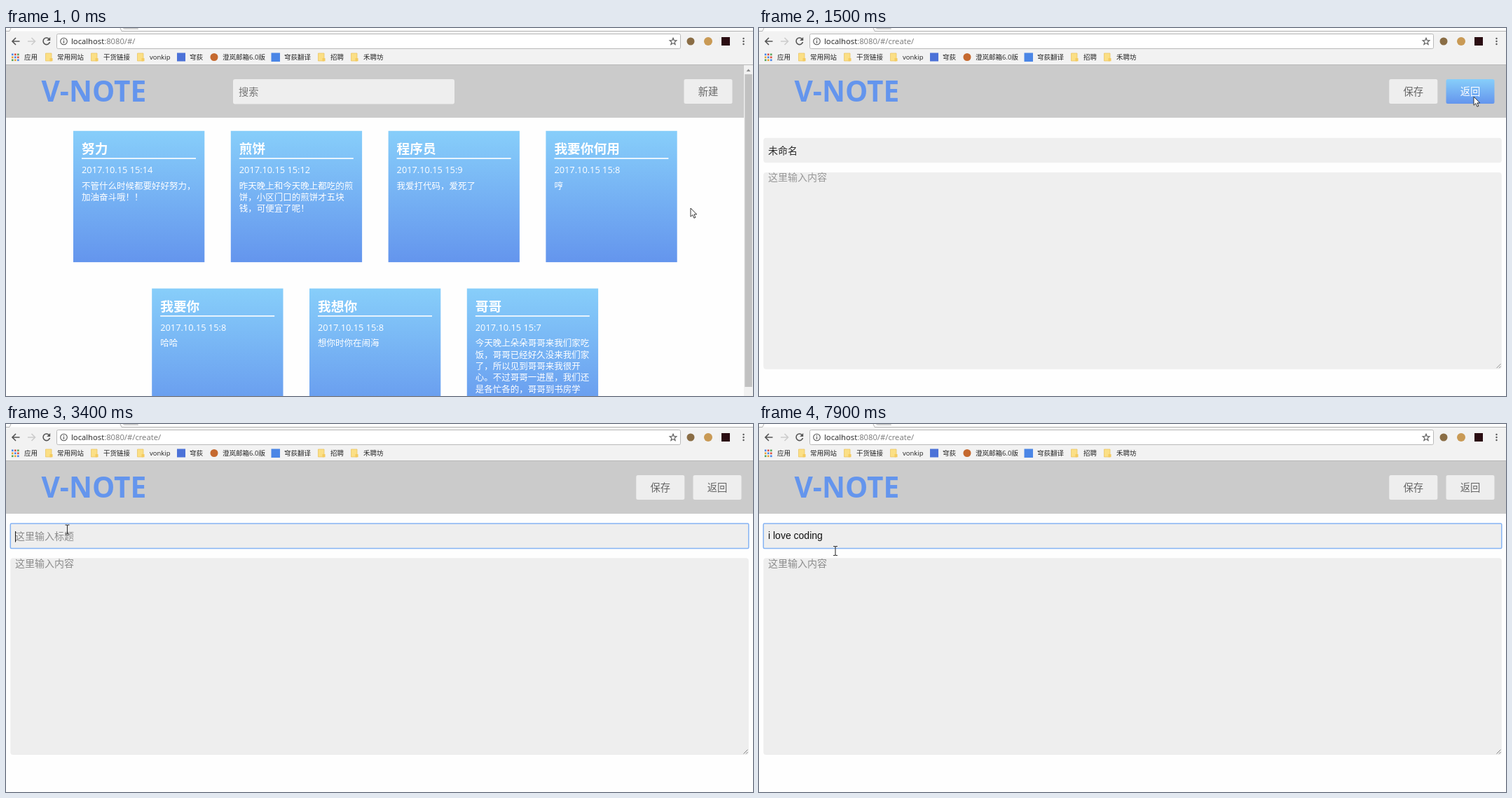
These frames come from a looping animation (1066 by 525 pixels, 8000 ms). An HTML page:

```html
<!DOCTYPE html>
<html lang="zh">
<head>
<meta charset="utf-8">
<title>V-NOTE</title>
<style>
html, body { margin: 0; width: 100%; height: 100%; overflow: hidden; background: #fefefe; }
svg { display: block; width: 1066px; height: 525px; }
text { font-family: "Open Sans", "Noto Sans CJK SC", "Noto Sans CJK", sans-serif; white-space: pre; }
.cjk { font-family: "Noto Sans CJK SC", "Noto Sans CJK", sans-serif; }
.typed { font-family: "Liberation Sans", "Noto Sans CJK SC", "Noto Sans CJK", sans-serif; }
</style>
</head>
<body>
<svg id="stage" viewBox="0 0 1066 525" xmlns="http://www.w3.org/2000/svg">
  <defs>
    <linearGradient id="sky" x1="0" y1="0" x2="0" y2="1">
      <stop offset="0" stop-color="#87cefa"/><stop offset="1" stop-color="#6495ed"/>
    </linearGradient>
  </defs>
</svg>
<script>
const stage = document.getElementById('stage');
const LOOP = 8000, STEP = 100;

function add(parent, tag, attrs, content) {
  const el = document.createElementNS('http://www.w3.org/2000/svg', tag);
  set(el, attrs);
  if (content !== undefined) el.textContent = content;
  parent.appendChild(el);
  return el;
}
function set(el, attrs) {
  for (const key in attrs) el.setAttribute(key, attrs[key]);
}
const show = (el, on) => el.setAttribute('display', on ? 'inline' : 'none');
const group = (parent = stage) => add(parent, 'g', {});
const rect = (p, x, y, width, height, fill, more) => add(p, 'rect', { x, y, width, height, fill, ...more });
const circle = (p, cx, cy, r, fill, more) => add(p, 'circle', { cx, cy, r, fill, ...more });
const path = (p, d, more) => add(p, 'path', { d, fill: 'none', ...more });
const label = (p, x, y, size, fill, str, more) => add(p, 'text', { x, y, 'font-size': size, fill, ...more }, str);

// Page background and header bar
rect(stage, 0, 0, 1066, 525, '#fefefe');
const listPage = group(), createPage = group();
rect(stage, 0, 53, 1066, 75, '#cbcbcb');
label(stage, 50.5, 105, 40.6, '#6495ed', 'V-NOTE', { 'font-weight': 700 });

const searchBox = group();
rect(searchBox, 324, 73, 316, 35.5, '#eee', { rx: 3 });
label(searchBox, 332, 95.5, 14.2, '#757575', '搜索', { class: 'cjk' });

function button(x, caption) {
  const g = group();
  const box = rect(g, x, 73, 69, 35, '#eee', { rx: 2.5 });
  const text = label(g, x + 34.5, 96, 14.3, '#666', caption, { class: 'cjk', 'text-anchor': 'middle' });
  return {
    g,
    hover(on, focused) {
      set(box, { fill: on ? 'url(#sky)' : '#eee', stroke: focused ? '#6f9fee' : 'none' });
      set(text, { fill: on ? '#fff' : '#666' });
    }
  };
}
const newButton = button(967.5, '新建');
const saveButton = button(886.3, '保存');
const backButton = button(967.5, '返回');

// Note cards
function card(x, y, title, time, lines) {
  const white = '#fff';
  rect(listPage, x, y, 187.3, 187.3, 'url(#sky)');
  label(listPage, x + 12, y + 32.5, 18.72, white, title, { class: 'cjk', 'font-weight': 700 });
  rect(listPage, x + 12, y + 38.5, 163, 1.6, white);
  label(listPage, x + 12, y + 60, 12.8, white, '2017.10.15 ' + time);
  lines.forEach((line, i) =>
    label(listPage, x + 12, y + 82.8 + i * 16.3, 12.5, white, line, { class: 'cjk' }));
}
[
  ['努力', '15:14', ['不管什么时候都要好好努力，', '加油奋斗哦！！']],
  ['煎饼', '15:12', ['昨天晚上和今天晚上都吃的煎', '饼，小区门口的煎饼才五块', '钱，可便宜了呢！']],
  ['程序员', '15:9', ['我爱打代码，爱死了']],
  ['我要你何用', '15:8', ['哼']],
  ['我要你', '15:8', ['哈哈']],
  ['我想你', '15:8', ['想你时你在闹海']],
  ['哥哥', '15:7', ['今天晚上朵朵哥哥来我们家吃', '饭，哥哥已经好久没来我们家',
    '了，所以见到哥哥来我很开', '心。不过哥哥一进屋，我们还', '是各忙各的，哥哥到书房学']]
].forEach((note, i) => {
  const lower = i > 3;
  card((lower ? 208.2 : 96) + (lower ? i - 4 : i) * 224.8, lower ? 371.6 : 146.8, ...note);
});

// Editor
const titleBox = rect(createPage, 6.3, 142, 1053.5, 35.5, '#eee', { rx: 4 });
const bodyBox = rect(createPage, 6.3, 191.3, 1053.5, 280.7, '#eee', { rx: 4 });
const grip = path(createPage, 'M1052.5 470.5l6-6M1056 470.5l2.5-2.5', { stroke: '#777', 'stroke-width': 0.9 });
const titleText = label(createPage, 13, 165, 14, '#111', '', { class: 'typed' });
label(createPage, 13, 203.6, 14, '#8c8c8c', '这里输入内容', { class: 'cjk', 'font-weight': 300 });
const caret = rect(createPage, 0, 153, 1, 15.5, '#111');

// Scrollbar
const scrollbar = group();
rect(scrollbar, 1053, 53, 13, 472, '#f1f1f1');
path(scrollbar, 'M1056.5 62l3-3.5 3 3.5z', { fill: '#8a8a8a' });
const thumb = rect(scrollbar, 1054.3, 66, 10.5, 446, '#c1c1c1');

// Browser frame
const chrome = group();
rect(chrome, 0, 0, 1066, 5, '#fff');
rect(chrome, 0, 4.5, 1066, 48, '#f2f2f2');
path(chrome, 'M0 4.5H5L7 0M163 0l2 4.5H1066', { stroke: '#b2b2b2' });
path(chrome, 'M167 0h20l2 1.5h-20z', { fill: '#ddd', stroke: '#bbb', 'stroke-width': 0.6 });
rect(chrome, 0, 52, 1066, 1, '#b8b8b8');
rect(chrome, 72.5, 8.5, 890, 21, '#fff', { rx: 2, stroke: '#b9b9b9' });
const dark = { stroke: '#555', 'stroke-width': 1.6 };
path(chrome, 'M19.5 19H9.5M14 14l-5 5 5 5', dark);
path(chrome, 'M31 19h10M36.5 14l5 5-5 5', { ...dark, stroke: '#ccc' });
path(chrome, 'M61.8 16A4.8 4.8 0 1 0 62.5 20', dark);
path(chrome, 'M63.2 13v5h-5z', { fill: '#555' });
circle(chrome, 82.5, 19, 4.8, 'none', { stroke: '#555', 'stroke-width': 1.1 });
path(chrome, 'M82.5 18.3v3.5M82.5 16v1.2', { stroke: '#555', 'stroke-width': 1.2 });
const star = Array.from({ length: 10 }, (_, i) => {
  const r = i % 2 ? 2.2 : 5.2, a = i * Math.PI / 5;
  return (952 + r * Math.sin(a)).toFixed(1) + ' ' + (19.4 - r * Math.cos(a)).toFixed(1);
});
path(chrome, 'M' + star.join('L') + 'z', { stroke: '#555', 'stroke-width': 1.1 });
circle(chrome, 977, 19, 5.5, '#8a6d45');
circle(chrome, 1002, 19, 6, '#c99a55');
rect(chrome, 1021, 13, 12, 12, '#2b0d12');
for (const y of [15, 19, 23]) circle(chrome, 1052.5, y, 1.2, '#555');

const url = label(chrome, 93, 23, 11.25, '#222', 'localhost');
const urlTail = add(url, 'tspan', { fill: '#777' });

// Bookmarks bar
const appColors = ['#d95040', '#4a87e8', '#e8a33a', '#58a55c'];
for (let i = 0; i < 9; i++)
  rect(chrome, 8 + i % 3 * 4, 36.5 + Math.floor(i / 3) * 4, 2.6, 2.6, appColors[(i * 3 + 1) % 4]);
const folder = x => {
  path(chrome, `M${x} 36h8.5v11h-8.5z`, { fill: '#fbdf85', stroke: '#e9c25c', 'stroke-width': 0.7 });
  path(chrome, `M${x + 6} 43h4v4.3h-4z`, { fill: '#f4cb5f' });
};
[56.5, 121.5, 187.5, 445.5, 492.5].forEach(folder);
rect(chrome, 244, 35.5, 12, 12, '#4c72d8');
circle(chrome, 297, 41.5, 5.5, '#c5692f');
rect(chrome, 378.5, 35.5, 12.5, 12.5, '#4b86e6');
[[26, '应用'], [73, '常用网站'], [139, '干货链接'], [205, 'vonkip'], [262, '穹荻'], [309, '澄岚邮箱6.0版'],
  [397, '穹荻翻译'], [463, '招聘'], [510, '禾聘坊']]
  .forEach(([x, name]) => label(chrome, x, 45.3, 9.5, '#222', name));

// Pointers
const arrow = path(stage, 'M0 0V12.2L2.8 9.6L4.9 14.2L6.9 13.3L4.9 8.9H8.7Z',
  { fill: '#fff', stroke: '#222', 'stroke-width': 0.9 });
const beam = path(stage, 'M-3 -6.5H-1L0 -5.8L1 -6.5H3M0 -5.8V5.8M-3 6.5H-1L0 5.8L1 6.5H3',
  { stroke: '#333', 'stroke-width': 1.1 });

// [time, x, y] pointer stops, linear between them
const route = [
  [0, 977, 257], [100, 978, 250], [200, 981, 228], [300, 987, 196], [400, 996, 162], [500, 1005, 132],
  [600, 1012, 111], [700, 1016, 101], [800, 1017, 98], [1400, 1017, 98], [1500, 1020, 98], [1600, 1018, 108],
  [1700, 900, 130], [1800, 640, 144], [1900, 330, 152], [2000, 170, 156], [2100, 90, 151],
  [2200, 87.5, 150.5], [7800, 87.5, 150.5], [7900, 109, 181]
];
function pointerAt(t) {
  const next = route.findIndex(p => p[0] >= t);
  if (next < 1) return route[next === 0 ? 0 : route.length - 1].slice(1);
  const [t0, x0, y0] = route[next - 1], [t1, x1, y1] = route[next];
  const k = (t - t0) / (t1 - t0);
  return [x0 + (x1 - x0) * k, y0 + (y1 - y0) * k];
}

// CSS "ease" curve
function ease(x) {
  if (x <= 0) return 0;
  if (x >= 1) return 1;
  const bez = (a, b, s) => 3 * a * s * (1 - s) ** 2 + 3 * b * s * s * (1 - s) + s ** 3;
  let lo = 0, hi = 1;
  for (let i = 0; i < 24; i++) {
    const mid = (lo + hi) / 2;
    if (bez(0.25, 0.25, mid) < x) lo = mid; else hi = mid;
  }
  return bez(0.1, 1, lo);
}

const DEFAULT = '未命名', PHRASE = 'i love coding ', HINT = '这里输入标题';
const eraseTimes = [3100, 3200, 3400];
const typeTimes = [4200, 4600, 5100, 5300, 5500, 5900, 6000, 6400, 6600, 6700, 6900, 7100, 7300, 7400];
const past = (times, t) => times.filter(x => x <= t).length;

function drawTitle(t) {
  const typed = PHRASE.slice(0, past(typeTimes, t));
  const value = typed || DEFAULT.slice(0, DEFAULT.length - past(eraseTimes, t));
  titleText.textContent = value || HINT;
  set(titleText, { fill: value ? '#111' : '#8c8c8c', y: typed ? 163.6 : 165 });
  const lastKey = [2200, ...eraseTimes, ...typeTimes].filter(x => x <= t).pop();
  show(caret, t >= 2200 && (t - lastKey) % 1000 < 500);
  const width = value ? titleText.getComputedTextLength() : 0;
  set(caret, { x: 13 + Math.round(width), y: typed ? 151.5 : 153 });
}

function render(now) {
  const t = Math.floor(now % LOOP / STEP) * STEP;
  const creating = t >= 1200;
  const [px, py] = pointerAt(t);

  show(listPage, !creating);
  show(searchBox, !creating);
  show(newButton.g, !creating);
  show(createPage, creating);
  show(saveButton.g, creating);
  show(backButton.g, creating);
  urlTail.textContent = creating ? ':8080/#/create/' : ':8080/#/';

  const entered = ease((t - 1085) / 557);
  const offset = 356 * (1 - entered);
  const scrolls = !creating || offset > 67;
  show(scrollbar, scrolls);
  set(thumb, { height: creating ? 234700 / (431 + offset) : 446 });

  const shift = `translate(${scrolls ? 0 : 13} 0)`;
  const fieldWidth = scrolls ? 1040.5 : 1053.5;
  set(saveButton.g, { transform: shift });
  set(backButton.g, { transform: shift });
  set(titleBox, { width: fieldWidth });
  set(bodyBox, { width: fieldWidth });
  set(grip, { transform: `translate(${scrolls ? -13 : 0} 0)` });
  set(createPage, { transform: `translate(0 ${offset.toFixed(2)})`, opacity: entered ** 2.5 });

  const overButton = py < 108 && px > 967;
  newButton.hover(overButton, t >= 1100);
  backButton.hover(overButton, false);

  const focused = t >= 2200;
  set(titleBox, { stroke: focused ? '#85b3f3' : 'none', 'stroke-width': 1.5, rx: focused ? 1.5 : 4 });
  drawTitle(t);

  const overField = creating && py > 142;
  show(arrow, !overField);
  show(beam, overField);
  set(overField ? beam : arrow, { transform: `translate(${px} ${py})` });
}

const start = performance.now();
function tick() {
  render(performance.now() - start);
  requestAnimationFrame(tick);
}
tick();
</script>
</body>
</html>
```
